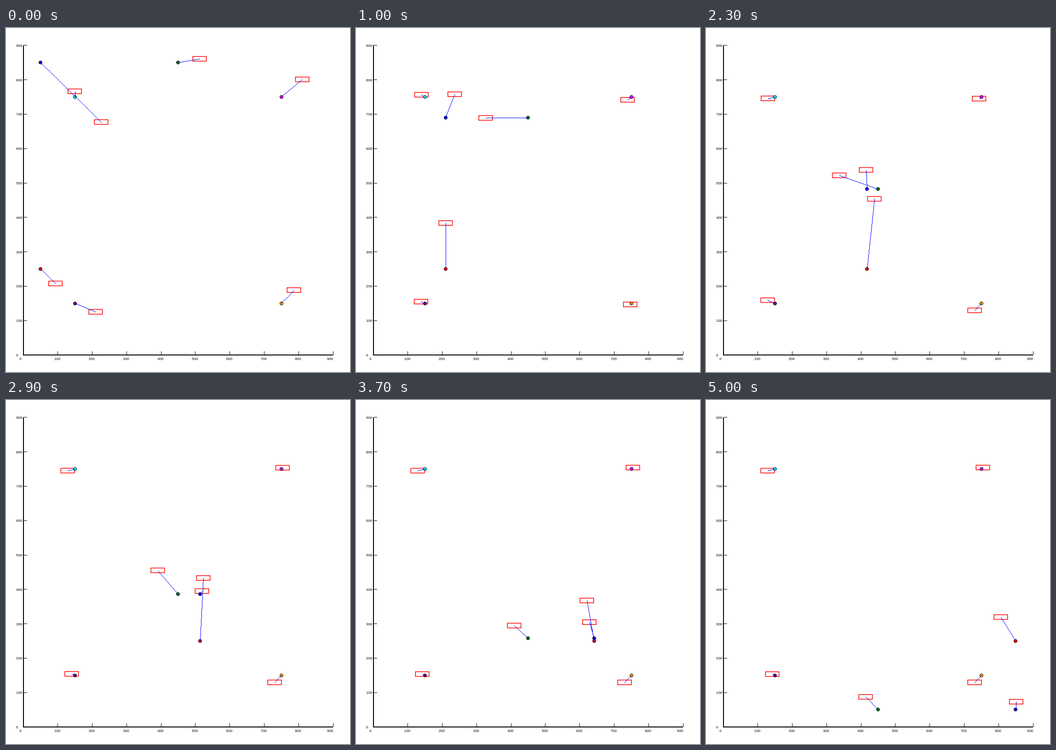
Recreate the animation shown at these times as an HTML page with a canvas. Size 748 by 748 pixels, loop 5.05 s.

```html
<!DOCTYPE html>
<html lang="en">
<head>
<meta charset="utf-8">
<title>Moving point labels</title>
<style>
  html, body { margin: 0; width: 100%; height: 100%; overflow: hidden; background: #fff; }
  canvas { display: block; }
</style>
</head>
<body>
<canvas id="stage" width="748" height="748"></canvas>
<script>
const STEP = 50, LAST = 100, SCALE = 0.748, RADIUS = 5 * SCALE;
const BOX = { w: 29.5, h: 10.2 };
const ctx = document.getElementById('stage').getContext('2d');
const px = x => SCALE * (x + 50);
const py = y => SCALE * (950 - y);

function drawAxes() {
  ctx.fillStyle = '#000';
  ctx.font = '8px "Liberation Sans", Arial, sans-serif';
  ctx.fillRect(37, 38, 2, 674);
  ctx.fillRect(37, 710, 674, 2);
  for (let v = 0; v <= 900; v += 100) {
    if (v) {
      ctx.fillRect(Math.round(px(v)), 703, 1, 8);
      ctx.fillRect(38, Math.round(py(v)), 8, 1);
    }
    ctx.textAlign = 'center';
    ctx.fillText(v, px(v) - (v % 900 ? 0.7 : 6), 722);
    ctx.textAlign = 'left';
    ctx.fillText(v, 22, py(v) + 3.4);
  }
}

function drawBox(x, y) {
  ctx.strokeStyle = '#f00';
  ctx.lineWidth = 1.5;
  ctx.strokeRect(x - BOX.w / 2, y - BOX.h / 2, BOX.w, BOX.h);
}

function drawDot(x, y, color) {
  ctx.beginPath();
  ctx.arc(Math.round(x - RADIUS) + 4, Math.round(y - RADIUS) + 4, 3.5, 0, 2 * Math.PI);
  ctx.fillStyle = color;
  ctx.fill();
  ctx.strokeStyle = '#000';
  ctx.lineWidth = 1;
  ctx.stroke();
}

// One-pixel line without smoothing.
function drawLink(x1, y1, x2, y2) {
  const count = Math.max(1, Math.round(Math.max(Math.abs(x2 - x1), Math.abs(y2 - y1))));
  ctx.fillStyle = '#00f';
  for (let i = 0; i <= count; i++) {
    const u = i / count;
    ctx.fillRect(Math.round(x1 + (x2 - x1) * u), Math.round(y1 + (y2 - y1) * u), 1, 1);
  }
}

const bell = (t, width) => Math.exp(-((t / width) ** 2));

// Offset relaxes from start to rest; an optional swing pulls it past rest around its peak.
const settle = (start, rest, width, swing = [0, 0], peak = 0) => (t, ...point) =>
  point.map((p, i) =>
    p + rest[i] + (start[i] - rest[i]) * bell(t, width) + swing[i] * bell(t - peak, 14));

// Smooth path through a few places, starting at rest.
const TIMES = [0, 20, 34, 58, 74, 86, 100];
const drift = (...places) => t => {
  let k = 0;
  while (k < TIMES.length - 2 && t >= TIMES[k + 1]) k++;
  const h = TIMES[k + 1] - TIMES[k], u = (t - TIMES[k]) / h;
  return [0, 1].map(axis => {
    const at = j => places[j][axis];
    const slope = (a, b) => (at(b) - at(a)) / (TIMES[b] - TIMES[a]);
    const speed = j => j ? slope(j - 1, Math.min(j + 1, TIMES.length - 1)) : 0;
    return at(k) + (at(k + 1) - at(k)) * u * u * (3 - 2 * u)
      + h * u * (1 - u) * (speed(k) * (1 - u) - speed(k + 1) * u);
  });
};

const items = [
  { color: '#00f', x: 50, y: 850, vx: 8, vy: -8, label: drift(
    [207, 204.5], [214.5, 144], [272, 201], [426, 415.5], [507.5, 483], [587, 556], [674.5, 656]) },
  { color: '#008000', x: 450, y: 850, vx: 0, vy: -8, label: drift(
    [421, 67], [282, 195.5], [255, 275], [330, 370.5], [344, 490.5], [343, 573], [347, 645.5]) },
  { color: '#f00', x: 50, y: 250, vx: 8, vy: 0, label: drift(
    [107.5, 555.5], [195, 424], [297, 371.5], [429, 387], [502, 436], [555, 463], [641, 472]) },
  { color: '#0ff', x: 150, y: 750, vx: 0, vy: 0, label: settle([0, -12], [-15.6, 4], 25) },
  { color: '#f0f', x: 750, y: 750, vx: 0, vy: 0,
    label: settle([46, -38], [3.6, -2.8], 12, [-26, 21.3], 31) },
  { color: '#800080', x: 150, y: 150, vx: 0, vy: 0,
    label: settle([45.4, 18.8], [-5.6, -2.4], 12, [-18.5, -7.6], 35) },
  { color: '#ffa500', x: 750, y: 150, vx: 0, vy: 0, label: settle([27.6, -28.6], [-14.4, 15.6], 18) }
];

function draw(step) {
  ctx.clearRect(0, 0, 748, 748);
  drawAxes();
  const poses = items.map(({ color, x, y, vx, vy, label }) => {
    const dot = [px(x + vx * step), py(y + vy * step)];
    return { color, dot, box: label(step, ...dot) };
  });
  for (const { box } of poses) drawBox(...box);
  for (const { dot, color } of poses) drawDot(...dot, color);
  for (const { dot, box } of poses) drawLink(...dot, ...box);
}

const start = performance.now();
function tick() {
  draw(Math.floor((performance.now() - start) / STEP) % (LAST + 1));
  requestAnimationFrame(tick);
}
tick();
</script>
</body>
</html>
```
